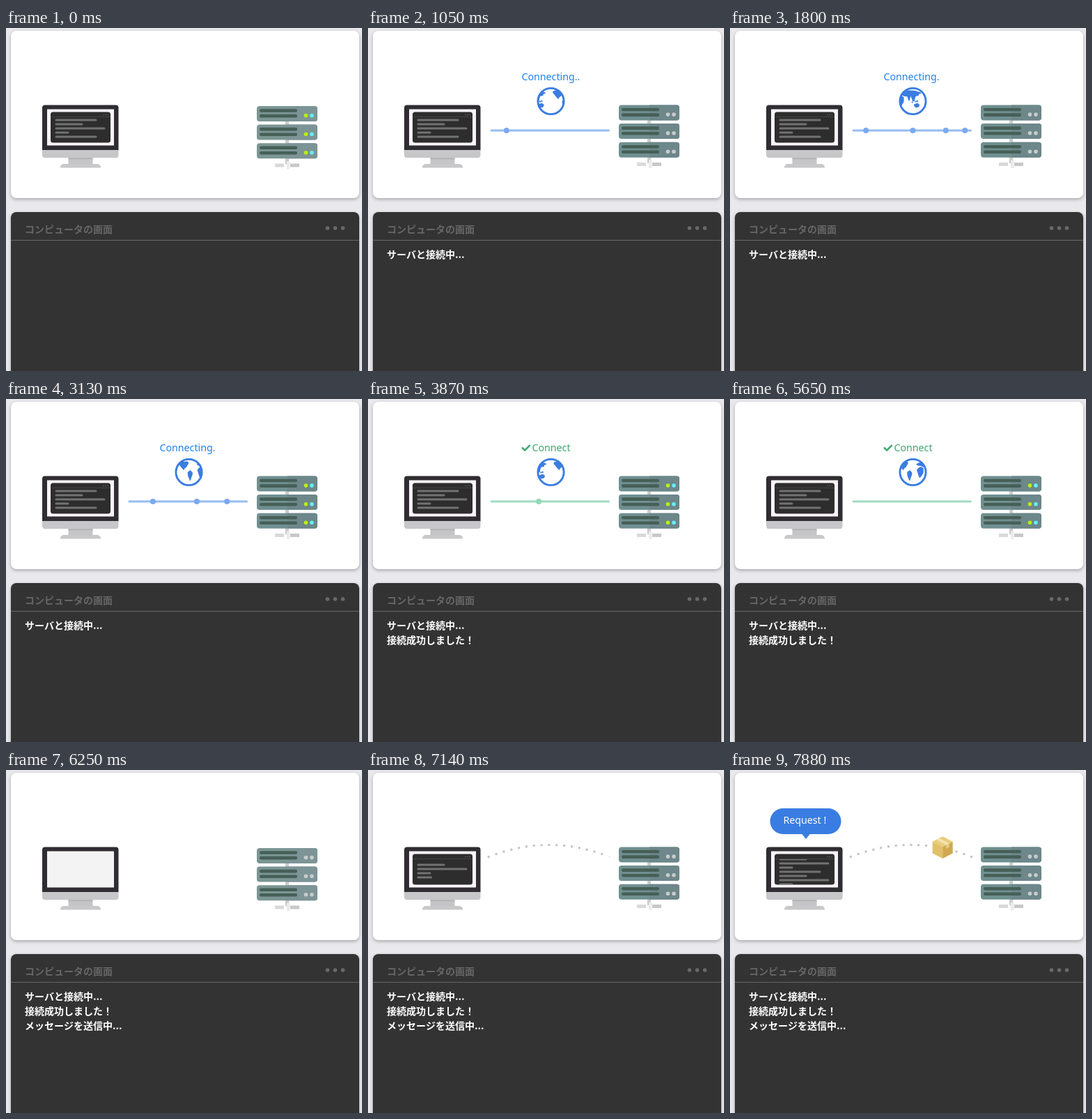
These frames come from a looping animation (511 by 492 pixels, 8 s). An HTML page with a canvas:

```html
<!DOCTYPE html>
<html lang="ja">
<head>
<meta charset="utf-8">
<title>サーバとの通信</title>
<style>
html, body { margin: 0; width: 100%; height: 100%; overflow: hidden; background: #e8e8ed; }
canvas { display: block; width: 511px; height: 492px; }
</style>
</head>
<body>
<canvas id="stage"></canvas>
<script>
const W = 511, H = 492, LOOP = 8000;
const canvas = document.getElementById("stage");
const ctx = canvas.getContext("2d");
const dpr = window.devicePixelRatio || 1;
canvas.width = W * dpr;
canvas.height = H * dpr;

const LATIN = '14.2px "Noto Sans", sans-serif';
const JAPANESE = 'bold 14px "Noto Sans CJK JP", "Noto Sans CJK", sans-serif';
const BLUE = "#3a7de2", GREEN = "#3fa872";

// Scene times in ms
const CONNECT = 981, LIGHTS_ON = 2600, SUCCESS = 3600, SEND = 5740;
const SERVER_UP = 6560, CODE = 6600, ARC = 6640, REQUEST = 7220;

const clamp = (v) => Math.max(0, Math.min(1, v));
const progress = (t, start, length) => clamp((t - start) / length);
const easeOut = (p) => 1 - (1 - p) ** 2;
const between = (t, a, b) => t >= a && t < b;
const times = (n, f) => Array.from({ length: n }, (_, i) => f(i));

function random(seed) {
  const v = Math.sin(seed * 12.9898) * 43758.5453;
  return v - Math.floor(v);
}

function rect(x, y, w, h, color, radius = 0) {
  ctx.fillStyle = color;
  ctx.beginPath();
  ctx.roundRect(x, y, w, h, radius);
  ctx.fill();
}

function disc(x, y, r, color) {
  ctx.fillStyle = color;
  ctx.beginPath();
  ctx.arc(x, y, r, 0, Math.PI * 2);
  ctx.fill();
}

function trace(points) {
  ctx.beginPath();
  for (const [x, y] of points) ctx.lineTo(x, y);
}

function poly(points, color) {
  trace(points);
  ctx.fillStyle = color;
  ctx.fill();
}

function stroke(points, color, width) {
  trace(points);
  ctx.strokeStyle = color;
  ctx.lineWidth = width;
  ctx.lineCap = ctx.lineJoin = "round";
  ctx.stroke();
}

function label(text, x, y, color, font) {
  ctx.font = font;
  ctx.fillStyle = color;
  ctx.fillText(text, x, y);
}

function scaled(x, y, s, draw) {
  if (s <= 0) return;
  ctx.save();
  ctx.translate(x, y);
  ctx.scale(s, s);
  ctx.translate(-x, -y);
  draw();
  ctx.restore();
}

function drawCards() {
  rect(0, 0, W, H, "#e8e8ed");
  ctx.save();
  ctx.shadowColor = "rgba(0,0,0,.28)";
  ctx.shadowBlur = 5 * dpr;
  ctx.shadowOffsetY = 2 * dpr;
  rect(7, 4, 500, 240, "#fff", 8);
  rect(7, 264, 500, 250, "#333", 8);
  ctx.restore();
  rect(7, 304, 500, 1, "#666");
  label("コンピュータの画面", 27, 293.5, "#666", JAPANESE);
  for (let i = 0; i < 3; i++) disc(461.5 + 11 * i, 287, 2.8, "#696969");
}

function drawMessages(t) {
  const rows = [["サーバと接続中...", CONNECT], ["接続成功しました！", SUCCESS], ["メッセージを送信中...", SEND]];
  rows.forEach(([text, start], i) => {
    if (t >= start) label(text, 27, 329.5 + 21 * i, "#fff", JAPANESE);
  });
}

const CODE_WIDTHS = [60, 40, 72, 20];

function drawCode(t) {
  const typing = t >= CODE;
  const count = typing ? 1 + (t - CODE) / 161 : 5;
  const top = typing ? 130 - 8 * Math.max(0, (t - 7140) / 740) : 132;
  ctx.save();
  ctx.beginPath();
  ctx.rect(64, 128, 86, 36);
  ctx.clip();
  for (let i = typing ? 1 : 0; i < count; i++) {
    const w = CODE_WIDTHS[i % 4] * Math.min(1, count - i);
    rect(70.5, top + 6 * i - 1.5, w, 3, "#727272", Math.min(1.5, w / 2));
  }
  ctx.restore();
}

function drawComputer(t) {
  const blank = between(t, SEND, CODE - 120);
  rect(52, 110.5, 109.5, 65, "#2f2d31", [4, 4, 0, 0]);
  rect(52, 175, 109.5, 11.3, "#c7c7c9", [0, 0, 4, 4]);
  rect(89.5, 186.3, 35, 9.2, "#c5c5c7");
  rect(89.5, 186.3, 35, 2, "#b2b2b4");
  rect(78, 195, 58, 5.5, "#c8c8ca", [5, 5, 0, 0]);
  rect(59, 116.5, 96, 52, blank ? "#f3f3f3" : "#f8f4f8");
  if (blank) return;
  ctx.save();
  if (t >= SEND) ctx.globalAlpha = progress(t, CODE - 120, 120);
  rect(64, 120.5, 86, 44, "#2e2d2d", 3.5);
  rect(64, 127, 86, 0.8, "#4c4c4c");
  for (let i = 0; i < 3; i++) disc(140 + 3 * i, 124.5, 0.8, "#666");
  drawCode(t);
  ctx.restore();
}

function drawServer(t) {
  const idle = t < CONNECT || between(t, SEND, SERVER_UP);
  const lit = t < CONNECT || between(t, LIGHTS_ON, SEND);
  ctx.save();
  if (idle) ctx.translate(0, 1.5);
  rect(401, 128, 5, 66, "#c9cccc");
  rect(386, 193, 13, 5, "#d9d9d9");
  rect(408, 193, 13, 5, "#c8c8c8");
  rect(403, 189.5, 4.5, 11.5, "#ebebeb");
  for (let i = 0; i < 3; i++) {
    const y = 110.5 + 26.6 * i;
    rect(360, y, 87, 22, idle ? "#7b9693" : "#709090", 4);
    rect(404, y, 43, 22, idle ? "#7d9496" : "#6d878a", [0, 4, 4, 0]);
    for (const dy of [4.2, 11.8]) rect(364, y + dy, 54, 4.6, "#465f57", 2);
    disc(430.5, y + 13.6, 2.8, lit ? "#b9f011" : "#c8cccb");
    disc(439, y + 13.6, 2.8, lit ? "#62f1f8" : "#c8cccb");
  }
  ctx.restore();
}

// A rough land mass in degrees, narrowing southwards by taper
function land(lon, lat, width, height, taper) {
  const n = 18;
  return times(n, (i) => {
    const a = i / n * Math.PI * 2;
    const r = 0.9 + 0.3 * random(lon + i);
    const narrow = 1 - taper * (1 - Math.sin(a)) / 2;
    return [lon + width / 2 * r * narrow * Math.cos(a), lat + height / 2 * r * Math.sin(a)];
  });
}

const LANDS = [
  land(-105, 46, 95, 55, 0.8),
  land(-58, -20, 46, 66, 0.8),
  land(18, 2, 62, 66, 0.6),
  land(80, 54, 165, 40, 0.1),
  land(78, 24, 34, 40, 0.9),
  land(110, 26, 40, 50, 0.6),
  land(134, -25, 38, 26, 0),
  ...times(4, (i) => land(102 + 12 * i, 8 - 14 * random(i + 1), 12, 9, 0))
];

function drawGlobe(t) {
  const cx = 262.5, cy = 105;
  const center = 106 - 0.13 * (t - 1800);
  ctx.save();
  ctx.beginPath();
  ctx.arc(cx, cy, 18, 0, Math.PI * 2);
  ctx.clip();
  for (const shape of LANDS) {
    const turn = Math.round((center - shape[0][0]) / 360);
    for (let k = turn - 1; k <= turn + 1; k++) {
      poly(shape.map(([lon, lat]) => [cx + 0.2 * (lon + 360 * k - center), cy + 0.5 - 0.22 * lat]), BLUE);
    }
  }
  ctx.restore();
  ctx.beginPath();
  ctx.arc(cx, cy, 18.6, 0, Math.PI * 2);
  ctx.strokeStyle = BLUE;
  ctx.lineWidth = 2.9;
  ctx.stroke();
}

// A train of dots that slow down towards the server
function drawPulses(t, start, count, gap, color) {
  for (let i = 0; i < count; i++) {
    const p = (t - start - gap * i) / 1044;
    if (p >= 0 && p < 1) disc(177 + 168 * easeOut(p), 147, 4, color);
  }
}

function drawLink(t) {
  if (!between(t, CONNECT, SEND)) return;
  const done = t >= SUCCESS;
  stroke([[177, 147], [345.5, 147]], done ? "#a0dcc1" : "#96bbf2", 3);
  if (done) {
    drawPulses(t, SUCCESS + 32, 3, 345, "#90d8b7");
    scaled(227, 70, easeOut(progress(t, SUCCESS, 150)), () =>
      stroke([[221.7, 70.3], [225.2, 73.6], [231.8, 66.8]], GREEN, 2.6));
    label("Connect", 235.5, 75, GREEN, LATIN);
  } else {
    for (const wave of [0, 1]) drawPulses(t, CONNECT + 1531 * wave, 4, 254, "#7ca9ee");
    const step = Math.floor((t - 1580) / 443) + 3;
    label("Connecting" + ".".repeat(step % 3 + 1), 220.5, 75, "#1d83ea", LATIN);
  }
  drawGlobe(t);
}

const arcY = (x) => 107.5 + 17 * ((x - 260) / 86.5) ** 2;

function drawArc(t) {
  const shown = (t - ARC) / 30.5;
  for (let i = 0; i < 17; i++) {
    const x = 173.3 + 10.83 * i;
    const s = clamp(shown - i);
    if (s > 0) disc(x, arcY(x), 1.8 * s, "#c6c6c6");
  }
}

// Isometric projection of a unit cube, z pointing down
const iso = ([x, y, z]) => [(x - y) * 14.5, (x + y) * 7.5 + z * 16.8 - 16];

function face(color, ...corners) {
  poly(corners.map(iso), color);
}

function drawPackage(t) {
  const p = progress(t, REQUEST, 865);
  const x = 173 + 173 * p;
  ctx.save();
  ctx.translate(x, arcY(x) - 1);
  scaled(0, 0, progress(p, 0, 0.12), () => {
    face("#e9cd7c", [0, 0, 0], [1, 0, 0], [1, 1, 0], [0, 1, 0]);
    face("#e0c06a", [0, 1, 0], [1, 1, 0], [1, 1, 1], [0, 1, 1]);
    face("#cfa851", [1, 0, 0], [1, 1, 0], [1, 1, 1], [1, 0, 1]);
    face("#f4e3b1", [0, 0.35, 0], [1, 0.35, 0], [1, 0.65, 0], [0, 0.65, 0]);
    face("#e6cc8a", [1, 0.35, 0], [1, 0.65, 0], [1, 0.65, 0.33], [1, 0.35, 0.33]);
  });
  ctx.restore();
}

function drawBubble(t) {
  scaled(109, 99, easeOut(progress(t, REQUEST, 200)), () => {
    rect(57.5, 55, 102, 37, BLUE, 18.5);
    poly([[103, 91.5], [115, 91.5], [109, 99]], BLUE);
    label("Request !", 76.5, 77, "#fff", LATIN);
  });
}

function draw(t) {
  ctx.setTransform(dpr, 0, 0, dpr, 0, 0);
  drawCards();
  drawMessages(t);
  drawComputer(t);
  drawServer(t);
  drawLink(t);
  if (t >= ARC) drawArc(t);
  if (t >= REQUEST) {
    drawPackage(t);
    drawBubble(t);
  }
}

const start = performance.now();
function tick() {
  draw((performance.now() - start) % LOOP);
  requestAnimationFrame(tick);
}
tick();
</script>
</body>
</html>
```
